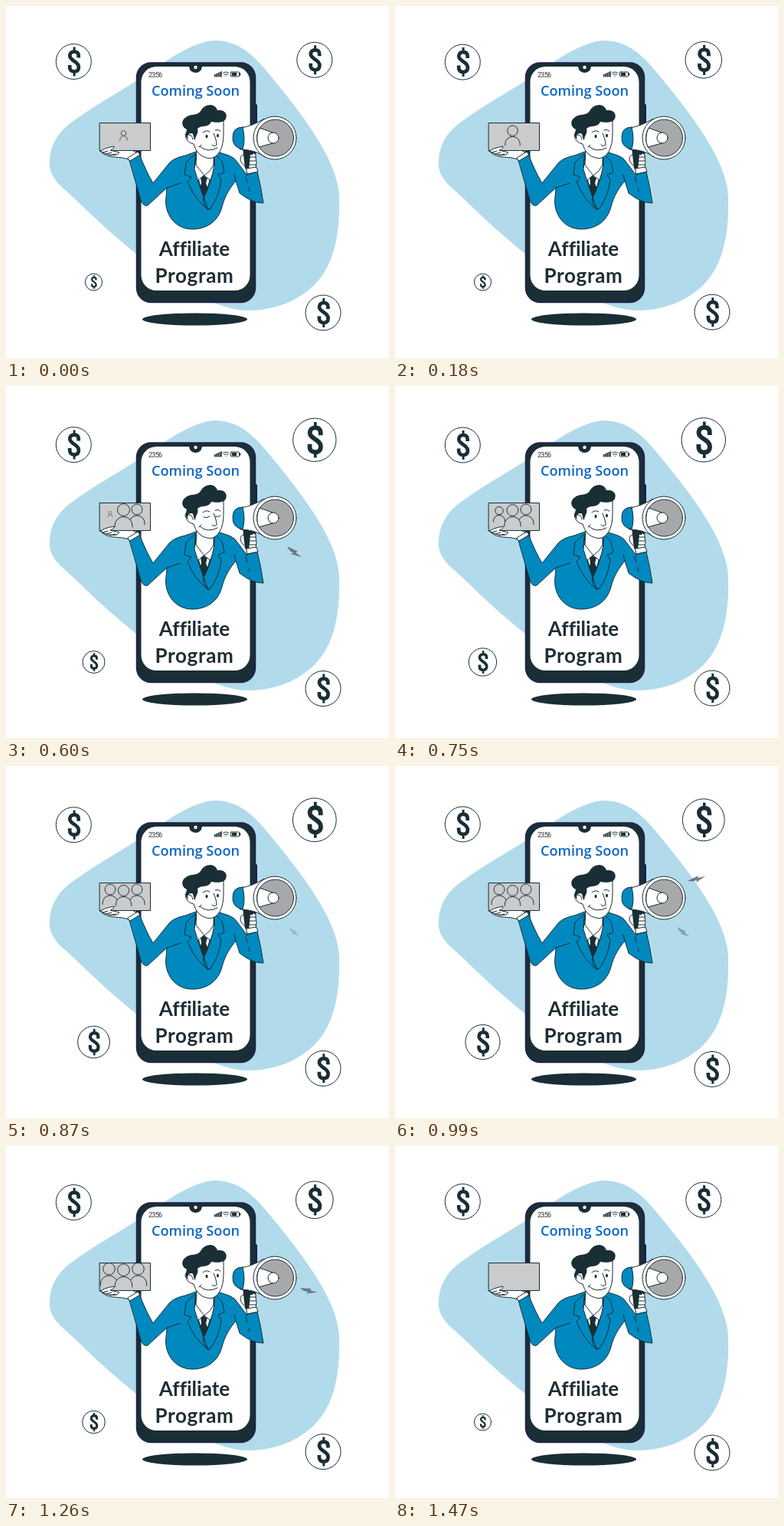
These frames come from a looping animation (500 by 459 pixels, 1500 ms). An HTML page:

```html
<!DOCTYPE html>
<html lang="en">
<head>
<meta charset="utf-8">
<title>Affiliate Program</title>
<style>
html, body { margin: 0; width: 100%; height: 100%; overflow: hidden; background: #fff; }
svg { display: block; width: 100vw; height: 100vh; }
.dark { fill: #1a2e35; }
.blue { fill: #0089bf; }
.line { stroke: #1a2e35; stroke-width: 1; stroke-linejoin: round; stroke-linecap: round; }
.white { fill: #fff; }
.none { fill: none; }
.title { font: 700 26px Lato, sans-serif; fill: #1f2d34; text-anchor: middle; font-variant-ligatures: none; }
#person * { vector-effect: non-scaling-stroke; }
</style>
</head>
<body>
<svg viewBox="0 0 500 459" preserveAspectRatio="xMidYMid meet">
  <defs>
    <g id="coin">
      <circle r="23" class="white" stroke="#1a2e35" vector-effect="non-scaling-stroke"/>
      <g fill="none" stroke="#1a2e35" transform="translate(.6 0)">
        <path stroke-width="4.7" d="M5.8-5V-7.5C5.8-11.3 3.8-13 .2-13S-5.6-11-5.6-7.5C-5.6-1 6-.5 6 7C6 11 3.8 13 .2 13S-5.7 11-5.7 7.5V4.5"/>
        <path stroke-width="3" d="M.2-19V-13M.2 13V19"/>
      </g>
    </g>
    <g id="person">
      <path d="M-11.5 15.500V13A11.5 11.5 0 0 1 11.5 13V15.5"/>
      <circle cy="-7.500" r="8"/>
    </g>
    <path id="bolt" d="M-12-2L3-3.500 2-1 12 0-3 4 0 1-6 1Z" fill="#5b656a"/>
    <clipPath id="lid"><path d="M123 153H188V188H123Z"/></clipPath>
  </defs>

  <path fill="#b1dbeb" d="M272 45C288 45 302 50 314 59C330 71 342 87 356 104C376 129 398 157 414 186C428 211 436 235 435 255C436 290 430 325 415 348C395 380 355 397 318 397C270 397 230 365 170 323C120 283 95 255 75 238C60 225 56 213 57 203C58 180 68 165 85 152C120 126 165 103 200 78C225 60 255 45 272 45Z"/>
  <ellipse cx="246.500" cy="408.500" rx="68.500" ry="8" class="dark"/>

  <!-- phone -->
  <rect x="323" y="128" width="5" height="31" rx="1.500" fill="#211f54"/>
  <rect x="170.500" y="74" width="155" height="312.500" rx="19" class="dark" stroke="#211f54" stroke-width="1.500"/>
  <rect x="176.500" y="79" width="142" height="292" rx="20" class="white"/>
  <path class="dark" d="M237 78.500Q239.500 79 239.500 80.500A8 6.500 0 0 0 255.500 80.500Q255.500 79 258 78.500Z"/>
  <circle cx="247.500" cy="80" r="2.200" class="white"/>
  <text x="186" y="92.800" font-family="Roboto, sans-serif" font-size="9" letter-spacing="-1.100" fill="#333">23:56</text>
  <path class="dark" d="M272 89h1.600v3.500h-1.600zM274.200 88h1.600v4.500h-1.600zM276.400 87h1.600v5.500h-1.600zM278.600 86h1.600v6.500h-1.600zM280.600 85h1.300v7.500h-1.300z"/>
  <path class="none line" d="M283.500 87.500Q287.300 84.500 291 87.500M285 89.500Q287.300 87.800 289.500 89.500M287.200 91.500h.1"/>
  <rect x="293.500" y="86" width="11" height="6" rx="1" class="none line"/>
  <path class="dark" d="M295 87h6v4h-6zM305 87.500h1.300v3h-1.300z"/>
  <text x="247.500" y="117" text-anchor="middle" font-family="Open Sans, sans-serif" font-weight="600" font-size="18.200" fill="#0c66c6">Coming Soon</text>
  <text x="246" y="326" class="title">Affiliate</text>
  <text x="246" y="361" class="title" letter-spacing=".7">Program</text>

  <!-- jacket -->
  <path class="blue line" d="M161 200L174 193Q183 216 192 231L213 205Q219 198 234 195L248 190H276L291 195Q298 197 303 205L315 221 316 217 328 216Q333 236 336 257Q321 257 305 244L300 228C293 237 286 246 282 262C277 281 262 291 243 291C220 291 206 270 209 249L210 237 185 260Q179 262 176 253Z"/>
  <path class="none line" d="M210 237L228 231M300 228L298 220M317 237L318 242M313 222L315 230"/>
  <path class="white line" d="M249 194L246 207 259 254 271 207 272 194Z"/>
  <path class="dark" d="M254 223L258 221 263 224 261 231 265 241 259 253 252 241 255 231Z"/>
  <path class="white line" d="M249 200L245 214 250 228 258 221 267 227 272 212 271 199Q260 211 249 200Z"/>
  <path class="blue line" d="M247 193L235 204 233 220 242 223 237 229Q246 252 264 266Q254 240 246 213ZM272 192L282 203 285 217 277 220 281 227Q278 250 266 265Q258 262 257 252Q268 232 272 207Z"/>

  <!-- head -->
  <path class="white line" d="M249 185L248 207Q257 219 259 221Q268 215 271 207L271 192Z"/>
  <path class="white line" d="M245 164Q236 161 234 168Q235 178 245 180Q249 195 262 198Q272 201 279 190Q284 181 284 167L284 149 250 151Z"/>
  <path class="none line" d="M238 168Q243 167 244 174"/>
  <path class="dark" d="M238 174C232 170 236 163 236 161C229 158 228 149 235 145C240 140 249 144 254 137C259 127 273 126 276 136C284 135 290 140 287 147C284 153 274 152 268 151C263 160 257 154 250 160C252 166 247 169 247 175C244 173 246 166 242 166C238 166 236 169 238 174Z"/>
  <path class="none line" d="M257 165Q261 161 266 164M273 162Q277 160 280 163M271 166Q275 175 275 181Q272 184 269 181M253 183Q263 192 276 185M252 184L255 181"/>
  <g id="open" class="dark"><ellipse cx="262" cy="170" rx="1.500" ry="2.200"/><ellipse cx="276.500" cy="169" rx="1.500" ry="2.200"/></g>
  <path id="shut" class="none line" d="M258 171Q262 173 266 170M273 170Q277 171.500 280 169"/>

  <!-- laptop -->
  <path class="white line" d="M123 189Q130 184 139 186L162 186 173 193 161 200Q151 197 141 197Q129 196 123 189Z"/>
  <rect x="122.500" y="152.500" width="66" height="36" fill="#c9cbcd" class="line"/>
  <g clip-path="url(#lid)"><g id="crowd" fill="#c9cbcd" stroke="#263238"></g></g>
  <path class="white line" d="M123 189Q130 185 136 184L141 183Q141 187 136 188L148 191 145 194Q134 196 123 189Z"/>
  <path class="none line" d="M126 191L133 189M130 193L138 191M135 195L143 193"/>
  <path class="white line" d="M159 198L172 190 175 194 162 202Z"/>

  <!-- megaphone -->
  <path class="white line" d="M315 219V211Q307 206 306 200Q306 194 311 194L314 197V192H324Q327 194 326 198Q328 203 326 211L328 216Z"/>
  <path class="dark" d="M309 185L325 187 322 194 319 194 317 214 312 212Z"/>
  <path class="none line" d="M318 197H326M318 202H326M317 207H326"/>
  <path class="white line" d="M314 212L327 210 329 216 315 219Z"/>
  <path class="white line" d="M306 159Q321 157 337 147L338 197Q325 187 306 187Z"/>
  <path class="blue line" d="M309 158Q296 158 296 171Q295 184 309 187Q313 174 309 158Z"/>
  <circle cx="351" cy="172" r="28" class="white line"/>
  <circle cx="351.500" cy="172" r="24" fill="#a7a8aa" class="line" stroke-width=".7"/>
  <path class="white line" d="M348 165L331 159Q325 172 330 184L348 179Z"/>
  <circle cx="349" cy="172" r="7" class="white line"/>

  <g id="bolts"></g>
  <g id="coins"></g>
</svg>
<script>
const LOOP = 1500, STEP = 30;
const $ = id => document.getElementById(id);

function add(shape, parent) {
  const el = document.createElementNS("http://www.w3.org/2000/svg", "use");
  el.setAttribute("href", "#" + shape);
  return $(parent).appendChild(el);
}

function place(el, x, y, scale = 1, turn = 0) {
  el.setAttribute("transform", `translate(${x} ${y}) rotate(${turn}) scale(${scale})`);
}

const ease = p => (1 - Math.cos(Math.PI * Math.min(1, Math.max(0, p)))) / 2;
const ramp = (t, a, b) => ease((t - a) / (b - a));
const pulse = (t, mid, half) => 1 - ramp(Math.abs(t - mid), 0, half);

const coins = [0, 1, 2, 3].map(() => add("coin", "coins"));

// Centre drawn last so it stands in front
const people = [
  { x: 136, y: 167.5, start: 490, end: 900, side: -1 },
  { x: 171, y: 167.5, start: 250, end: 600, side: 1 },
  { x: 153.5, y: 169, start: -200, end: 330, side: 0 }
].map(p => ({ ...p, el: add("person", "crowd") }));

const bolts = [
  { x: 394, y: 147.5, turn: -20, times: [990] },
  { x: 395, y: 189, turn: 9, times: [360, 1250] },
  { x: 376, y: 217, turn: 32, times: [600, 940] }
].map(b => ({ ...b, el: add("bolt", "bolts") }));

function drawCoins(t) {
  const wave = (1 - Math.cos(2 * Math.PI * t / LOOP)) / 2;
  const grow = t < 1080 ? ramp(t, 330, 1080) : 1 - ramp(t, 1080, 1370);
  place(coins[0], 88.3, 72.5 + 4.5 * wave);
  place(coins[1], 402.8, 70.3, 1 + .25 * wave);
  place(coins[2], 114.5, 360, .48 + .52 * grow);
  place(coins[3], 414, 400 - 6 * wave);
}

function drawPeople(t) {
  const swell = ramp(t, 990, 1260);
  for (const p of people) {
    const g = ramp(t, p.start, p.end);
    const full = p.side ? .87 : 1 - .12 * ramp(t, 560, 900);
    const size = (.15 + .85 * g) * full + .1 * swell;
    place(p.el, p.x + 1.5 * p.side * swell, p.y, size);
    p.el.setAttribute("opacity", t < p.start ? 0 : Math.min(1, .2 + g * 1.8));
  }
  $("crowd").setAttribute("opacity", 1 - ramp(t, 1290, 1440));
}

function drawBolts(t) {
  for (const b of bolts) {
    const k = Math.max(...b.times.map(m => pulse(t, m, 120)));
    place(b.el, b.x, b.y, .6 + .4 * k, b.turn);
    b.el.setAttribute("opacity", .85 * k);
  }
}

function draw(t) {
  drawCoins(t);
  drawPeople(t);
  drawBolts(t);
  const blink = t >= 540 && t < 690;
  $("open").style.display = blink ? "none" : "";
  $("shut").style.display = blink ? "" : "none";
}

const begin = performance.now();
function tick() {
  const t = (performance.now() - begin) % LOOP;
  draw(Math.floor(t / STEP) * STEP);
  requestAnimationFrame(tick);
}
tick();
</script>
</body>
</html>
```
